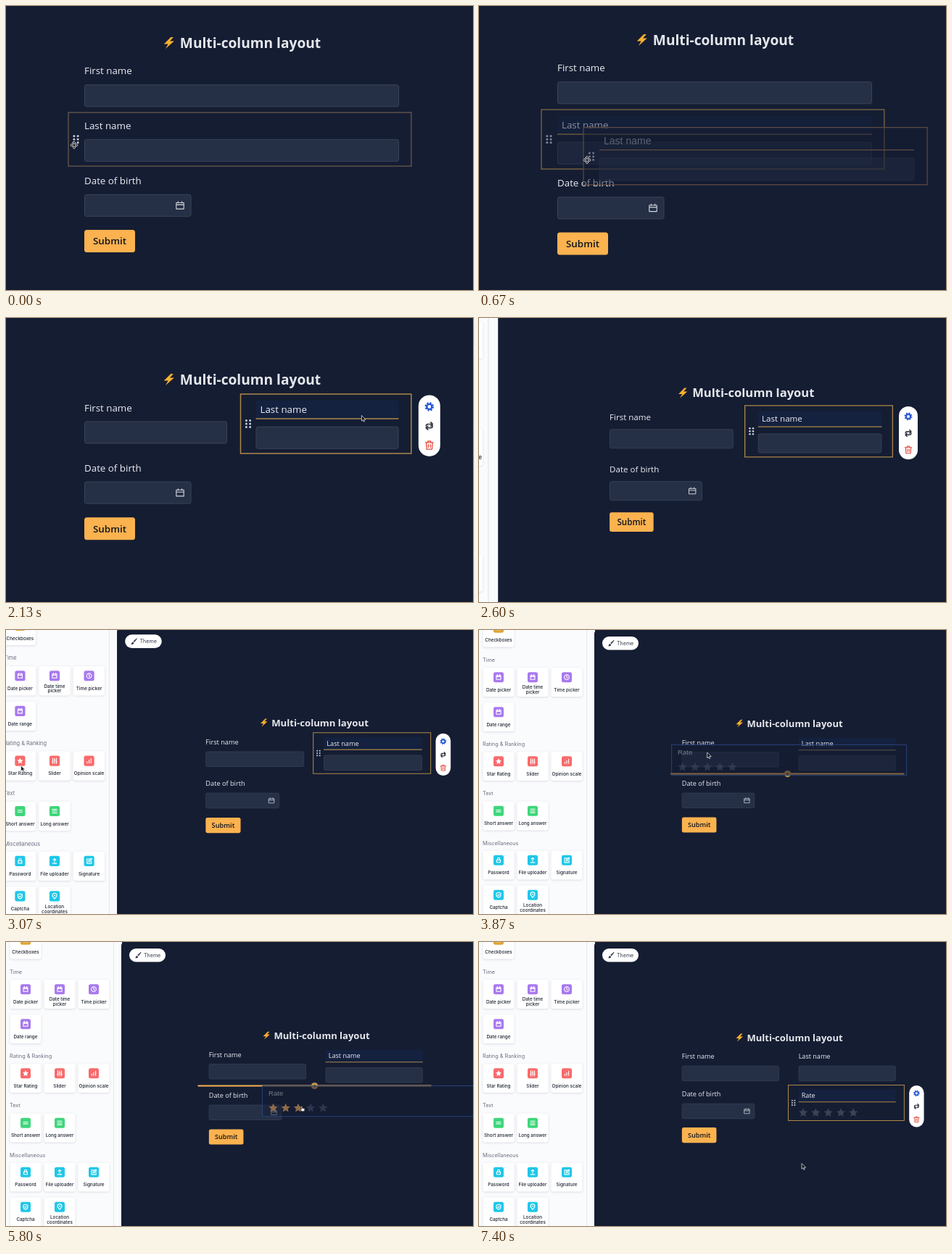
Animation, 644 px wide and 392 px high, one loop 7670 ms. Source, as an HTML page with a canvas:

```html
<!DOCTYPE html>
<html lang="en">
<head>
<meta charset="utf-8">
<title>Multi-column layout</title>
<style>
  html, body { margin: 0; width: 100%; height: 100%; overflow: hidden; background: #151d33; }
  canvas { display: block; width: 644px; height: 392px; }
</style>
</head>
<body>
<canvas id="stage"></canvas>
<script>
const W = 644, H = 392, LOOP = 7670, STEP = 200 / 3;
const NAVY = '#151d33', FIELD = '#252f45', EDGE = '#3a4458', ORANGE = '#fbb24f', GOLD = '#ad8848', TEXT = '#eceef2';
const SANS = '"Open Sans", "Noto Sans", sans-serif', UI = 'Inter, sans-serif';
const PIVOT = [645, 223], FAR = 0.68;

const canvas = document.getElementById('stage');
const dpr = window.devicePixelRatio || 1;
canvas.width = W * dpr;
canvas.height = H * dpr;
const c = canvas.getContext('2d');

// Motion helpers
const clamp = (v) => Math.max(0, Math.min(1, v));
const smooth = (u) => u * u * (3 - 2 * u);
const within = (t, a, b) => t >= a && t < b;

function along(keys, t) {
  let i = 0;
  while (i < keys.length - 2 && t >= keys[i + 1][0]) i++;
  const [a, b] = [keys[i], keys[i + 1]];
  const u = clamp((t - a[0]) / (b[0] - a[0]));
  return [a[1] + (b[1] - a[1]) * u, a[2] + (b[2] - a[2]) * u];
}

const POINTER = [
  [0, 94, 192], [470, 94, 192], [670, 150, 213], [930, 370, 175], [1200, 515, 120], [1400, 518.5, 121],
  [1800, 522, 125], [2070, 490, 135], [2450, -20, 185], [2850, -20, 185], [3100, 27, 188],
  [3200, 27, 188], [3600, 279, 190], [3670, 291, 192], [3870, 315, 169], [4130, 321, 113],
  [4400, 321, 113], [5000, 326, 264], [5130, 335, 272], [5200, 325, 272], [5530, 328, 222],
  [5670, 332, 223], [5800, 408, 228], [6400, 483, 246], [6930, 483, 246], [7130, 580, 172], [7400, 445, 306]
];
const FIELD_GHOST = [[470, 88, 146], [670, 145, 168], [930, 365, 130], [1200, 510, 75], [1400, 513.5, 75.5], [1600, 516, 76]];
const RATE_GHOST = [
  [3200, -22, 177], [3600, 232, 179], [3670, 242, 181], [3870, 266, 158], [4130, 272, 102], [4400, 272, 102],
  [5000, 284.5, 239.5], [5130, 295, 246], [5200, 285, 246], [5530, 285, 193], [5670, 285, 193],
  [5800, 353.5, 198.5], [6400, 430, 218]
];

// Label heights of every form state
const LAYOUTS = [
  { title: 51, first: 89.5, last: 165, birth: 241, submit: 309 },
  { title: 47, first: 85.5, last: 164, birth: 244.5, submit: 312.5 },
  { title: 85, first: 123.7, last: 126, birth: 206.8, submit: 275.2 },
  { title: 89.2, first: 127.6, last: 127.6, birth: 204.2, submit: 271.6 }
];

// Drawing helpers
function box(x, y, w, h, r, fill, stroke, lw = 1) {
  c.beginPath();
  c.roundRect(x, y, w, h, r);
  if (fill) { c.fillStyle = fill; c.fill(); }
  if (stroke) { c.strokeStyle = stroke; c.lineWidth = lw; c.stroke(); }
}

function text(str, x, y, size, color, weight = 400, family = SANS, align = 'left') {
  c.font = `${weight} ${size}px ${family}`;
  c.textAlign = align;
  c.fillStyle = color;
  c.fillText(str, x, y + size * 0.36);
}

function line(x1, y1, x2, y2, color, lw) {
  c.beginPath();
  c.moveTo(x1, y1);
  c.lineTo(x2, y2);
  c.strokeStyle = color;
  c.lineWidth = lw;
  c.stroke();
}

function dot(x, y, r, fill) {
  c.beginPath();
  c.arc(x, y, r, 0, 7);
  c.fillStyle = fill;
  c.fill();
}

function star(x, y, r, fill) {
  c.beginPath();
  for (let i = 0; i < 10; i++) {
    const d = i % 2 ? r * 0.47 : r, a = i * Math.PI / 5;
    c.lineTo(x + d * Math.sin(a), y - d * Math.cos(a));
  }
  c.closePath();
  c.fillStyle = fill;
  c.fill();
}

function icon(path, x, y, scale, stroke, fill, lw = 1) {
  c.save();
  c.translate(x, y);
  c.scale(scale, scale);
  const p = new Path2D(path);
  if (fill) { c.fillStyle = fill; c.fill(p); }
  if (stroke) {
    c.strokeStyle = stroke;
    c.lineWidth = lw;
    c.lineJoin = c.lineCap = 'round';
    c.stroke(p);
  }
  c.restore();
}

const GLYPH = {
  calendar: 'M-3-2.5h6v5.5h-6zM-3-.8h6M-1.6-3.6v1.6M1.6-3.6v1.6',
  clock: 'M3.3 0a3.3 3.3 0 1 1-6.6 0a3.3 3.3 0 1 1 6.6 0M0-1.7v1.9l1 .8',
  check: 'M-3-3h6v6h-6zM-1.4 0l1 1l2-2',
  sliders: 'M-2.5-3.5v7M0-3.5v7M2.5-3.5v7M-3.2 1.3h1.4M-.7-1h1.4M1.8 1h1.4',
  bars: 'M-2.6 1v2M0-1v4M2.6-3v6',
  short: 'M-3-1.2h6M-3 1.2h6',
  long: 'M-3-2.4h6M-3 0h6M-3 2.4h6',
  lock: 'M-2.5-.3h5v3.3h-5zM-1.5-.3v-1.5a1.5 1.5 0 0 1 3 0v1.5',
  upload: 'M0 1.4v-4.6M-1.8-1.5l1.8-1.8l1.8 1.8M-2.8 3.2h5.6',
  pen: 'M.5-2.8h-3.4v6h6v-3M-.8 1l.3-1.4l3.3-3.2l1 1l-3.2 3.3z',
  shield: 'M0-3.5l3 1v2.5q0 2.4-3 3.6q-3-1.2-3-3.6v-2.5zM-1.2 0l.9.9l1.6-1.7',
  pin: 'M0 3.6q-3-3.2-3-4.7a3 3 0 0 1 6 0q0 1.5-3 4.7zM.4-1a.4.4 0 1 1-.8 0a.4.4 0 1 1 .8 0'
};

// Sidebar
const PURPLE = '#a879ee', RED = '#f96a6b', GREEN = '#3fd67b', CYAN = '#1fc7e8';
const CARDS = [
  [-16.5, '#e2a52f', [['check', 'Checkboxes']]],
  [52, PURPLE, [['calendar', 'Date picker'], ['calendar', 'Date time|picker'], ['clock', 'Time picker']]],
  [100, PURPLE, [['calendar', 'Date range']]],
  [168, RED, [['star', 'Star Rating'], ['sliders', 'Slider'], ['bars', 'Opinion scale']]],
  [236.5, GREEN, [['short', 'Short answer'], ['long', 'Long answer']]],
  [304.5, CYAN, [['lock', 'Password'], ['upload', 'File uploader'], ['pen', 'Signature']]],
  [352.5, CYAN, [['shield', 'Captcha'], ['pin', 'Location|coordinates']]]
];
const HEADINGS = [['Time', 41], ['Rating & Ranking', 157], ['Text', 225.5], ['Miscellaneous', 294]];

function card(x, y, color, glyph, label) {
  c.save();
  c.shadowColor = 'rgba(30,40,70,.16)';
  c.shadowBlur = 3 * dpr;
  c.shadowOffsetY = dpr * 0.7;
  box(x, y, 43, 40, 3, '#fff');
  c.restore();
  const mid = x + 21.5;
  box(mid - 7, y + 6.2, 14, 14, 2.5, color);
  if (glyph === 'star') star(mid, y + 13.4, 4.3, '#fff');
  else icon(GLYPH[glyph], mid, y + 13.2, 1, '#fff', null, 1.1);
  const rows = label.split('|');
  rows.forEach((row, i) =>
    text(row, mid, y + 30.5 + (i - (rows.length - 1) / 2) * 6.6, 6.3, '#1d2330', 500, UI, 'center'));
}

function sidebar() {
  c.fillStyle = '#fafbfd';
  c.fillRect(-400, -200, 560, 800);
  line(148.5, -200, 148.5, 600, '#dfe2e8', 0.8);
  for (const [label, y] of HEADINGS) text(label, 5, y, 7.3, '#697080', 400, UI);
  for (const [y, color, items] of CARDS)
    items.forEach(([glyph, label], i) => card(5.5 + 47 * i, y, color, glyph, label));
  box(159, 0, 900, 800, 5, NAVY);
  box(170, 9, 50, 18.5, 9.25, '#fff');
  icon('M4-4.5q.8.4.2 1.3l-3.5 4.4l-1.6-1.4zM-1.4.6l1.6 1.4q.2 2.4-4.4 2q1.4-.7 1.2-2q.2-1.3 1.6-1.4z', 182, 18.3, 1, null, '#39404f');
  text('Theme', 190, 18.3, 7.1, '#343b4a', 400, UI);
}

// Form
function handle(x, y) {
  for (let i = 0; i < 6; i++)
    dot(x + (i % 2 ? 2.6 : -2.6), y + ((i >> 1) - 1) * 4.6, 1.5, '#c9cdd6');
}

function labelBar(label, x, y, w) {
  box(x, y - 12, w, 24, 0, '#14213f');
  line(x, y + 12.9, x + w, y + 12.9, GOLD, 1.5);
  text(label, x + 6, y, 13.35, TEXT, 500);
}

function field(label, x, y, w, active) {
  if (active) labelBar(label, x, y, w);
  else text(label, x, y, 13.35, TEXT, 500);
  box(x + 0.5, y + (active ? 24.2 : 19.3), w - 1, 30, 2.5, FIELD, EDGE);
}

function frame(x, y, h, color, lw = 1.5) {
  box(x, y, 558.8 - x, h, 0, null, color, lw);
  handle(x + 10.5, y + h / 2);
}

function toolbar(y) {
  const x = 583.8;
  box(x - 15, y, 30, 84.5, 15, '#fff');
  c.save();
  c.setLineDash([2.1, 1.83]);
  c.beginPath();
  c.arc(x, y + 16, 5, 0, 2 * Math.PI);
  c.strokeStyle = '#2857d5';
  c.lineWidth = 2.6;
  c.stroke();
  c.setLineDash([]);
  c.beginPath();
  c.arc(x, y + 16, 3.5, 0, 7);
  c.lineWidth = 2.4;
  c.stroke();
  c.restore();
  icon('M-4.5.2q0-2.6 2.6-2.6h6.4M2-5l2.6 2.6l-2.6 2.6M4.5-.2q0 2.9-2.6 2.9h-6.4M-2 .1l-2.6 2.6l2.6 2.6', x, y + 42.5, 1, '#30343d', null, 1.6);
  icon('M-5.5-3.5h11M-2-3.5v-2h4v2M-4.2-3.5l.5 9.2h7.4l.5-9.2M-1.4-.8v4M1.4-.8v4', x, y + 69, 1, '#e8483f', null, 1.3);
}

function stars(x, y, r, gap, lit, dim) {
  for (let i = 0; i < 5; i++) star(x + i * gap, y, r, i < lit ? '#8f6b4a' : dim);
}

function form(t, state) {
  const L = LAYOUTS[state];
  const dragging = within(t, 470, 1600);
  const split = state > 1;
  icon('M2.5-8L-7 1.6h5.8L-4.8 8L7-2.4H1.2L6-8z', 224.8, L.title, 1, null, '#fbb02f');
  text('Multi-column layout', 337, L.title, 19.15, '#e6e8ec', 700, SANS, 'center');

  field('First name', 108, L.first, split ? 197 : 434);
  c.globalAlpha = dragging ? 0.55 : 1;
  field('Last name', split ? 344.5 : 108, L.last, split ? 197 : 434, state === 1 || state === 2);
  c.globalAlpha = 1;

  field('Date of birth', 108, L.birth, 147.5);
  icon('M-5.2-3.8h10.4v8.6h-10.4zM-5.2-.9h10.4M-2.6-5.4v2M2.6-5.4v2', 240, L.birth + 34.3, 1, '#d3d6dd', null, 1.1);
  box(108, L.submit, 70, 31, 3.5, ORANGE);
  text('Submit', 143, L.submit + 15.5, 13.4, '#10141e', 600, SANS, 'center');

  if (state === 0) frame(86, 147, 74, '#5d5047');
  if (state === 1) {
    c.globalAlpha = dragging ? 0.6 : 1;
    frame(86, L.last - 21, 82, GOLD);
    c.globalAlpha = 1;
    if (!dragging) toolbar(L.last - 20);
  }
  if (state === 2 && t < 3670) {
    frame(323.5, L.last - 21, 82, GOLD);
    toolbar(L.last - 19.6);
  }
  if (state === 3) {
    frame(323.7, 185.5, 72, GOLD);
    labelBar('Rate', 344.5, 206.8, 197);
    stars(354, 241.6, 9.5, 25.4, 0, '#3a4458');
    toolbar(186.2);
  }
}

function dropLine(x1, y1, x2, y2) {
  const x = (x1 + x2) / 2, y = (y1 + y2) / 2;
  line(x1, y1, x2, y2, ORANGE, 3);
  dot(x, y, 6.8, '#c9934c');
  line(x - 3, y, x + 3, y, '#4a3a28', 1.3);
  line(x, y - 3, x, y + 3, '#4a3a28', 1.3);
}

function dropTarget(t) {
  if (within(t, 1000, 1600)) return dropLine(558, 67, 558, 142.5);
  if (within(t, 6050, 6530)) return dropLine(558, 187, 558, 262);
  if (!within(t, 3670, 6050)) return;
  let y = 187;
  if (within(t, 4050, 4620)) y = 105.5;
  if (within(t, 4850, 5370)) y = 263.4;
  dropLine(85.5, y, 559, y);
}

function fieldGhost(t) {
  const [x, y] = along(FIELD_GHOST, t);
  box(x, y, 474, 79, 0, 'rgba(21,29,51,.5)', '#5b4b42', 1.2);
  line(x + 22, y + 31, x + 456, y + 31, '#5b4b42', 1.2);
  text('Last name', x + 28, y + 18.5, 14, '#5d6473', 400, '"Liberation Sans", Arial, sans-serif');
  box(x + 22, y + 42, 434, 31, 2.5, 'rgba(37,47,69,.4)', 'rgba(58,68,88,.3)');
  c.globalAlpha = 0.5;
  handle(x + 11, y + 40);
  c.globalAlpha = 1;
}

function rateGhost(t, px) {
  const [x, y] = along(RATE_GHOST, t);
  const lit = within(t, 5670, 6530) ? Math.max(0, Math.min(5, Math.round((px - x - 6) / 17.2))) : 0;
  box(x, y, 324, 42.3, 0, 'rgba(21,29,51,.5)', '#2c477f', 0.9);
  text('Rate', x + 8.5, y + 10.5, 9.6, '#747b88', 400, '"Liberation Sans", Arial, sans-serif');
  stars(x + 15, y + 30.8, 6.5, 17.2, lit, 'rgba(64,74,96,.6)');
}

function pointer(t, x, y) {
  if (t < 2000) {
    icon('M0-6.5l2.5 2.7h-1.3v2.6h2.6v-1.3L6.5 0l-2.7 2.5v-1.3h-2.6v2.6h1.3L0 6.5l-2.5-2.7h1.3v-2.6h-2.6v1.3L-6.5 0l2.7-2.5v1.3h2.6v-2.6h-1.3z',
      x, y, 0.8, '#e4e5e8', '#111', 1.1);
  } else if (within(t, 5670, 6530)) {
    icon('M-1-3.5q1-.9 1.3.4l.5 2.3l2.7.5q1.2.3.9 1.6l-.7 3h-4l-2.4-3.3q.3-1.2 1.7-.2z', x, y + 2, 0.9, '#222', '#f2f2f2', 0.8);
  } else {
    icon('M0 0v8l1.9-1.6l1.3 2.8l1.4-.6l-1.3-2.8h2.5z', x, y, 0.9, '#d8dae0', '#0b0d14', 0.9);
  }
}

function draw(now) {
  const t = Math.floor((now % LOOP) / STEP + 1e-6) * STEP;
  const zoom = 1 - (1 - FAR) * smooth(clamp((t - 2145) / 1020));
  const state = t < 130 ? 0 : t < 1600 ? 1 : t < 6530 ? 2 : 3;
  const [px, py] = along(POINTER, t);
  const view = (k, paint) => {
    c.save();
    c.translate(...PIVOT);
    c.scale(k, k);
    c.translate(-PIVOT[0], -PIVOT[1]);
    paint();
    c.restore();
  };

  c.setTransform(dpr, 0, 0, dpr, 0, 0);
  c.fillStyle = NAVY;
  c.fillRect(0, 0, W, H);
  view(zoom / FAR, sidebar);
  view(zoom, () => form(t, state));
  if (within(t, 470, 1600)) fieldGhost(t);
  view(zoom, () => dropTarget(t));
  if (within(t, 3200, 6530)) rateGhost(t, px);
  pointer(t, px, py);
}

const start = performance.now();
function tick() {
  draw(performance.now() - start);
  requestAnimationFrame(tick);
}
tick();
</script>
</body>
</html>
```
